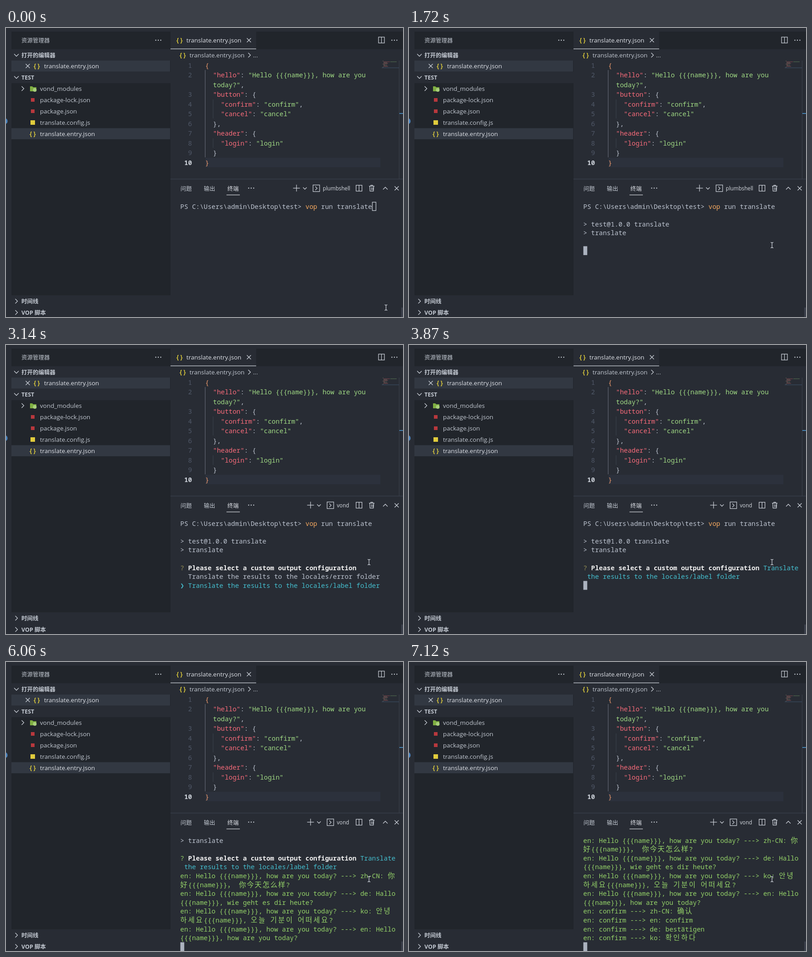
Recreate the animation shown at these times as an HTML page. Size 876 px wide and 639 px high, loop 8 s.

```html
<!DOCTYPE html>
<html lang="zh">
<head>
<meta charset="utf-8">
<title>Terminal translate</title>
<style>
html, body { margin: 0; width: 100%; height: 100%; overflow: hidden; background: #282c34; }
svg { display: block; }
text { font: 13.5px "Open Sans", "Noto Sans CJK SC", sans-serif; fill: #c2c8d1; white-space: pre; }
.mono text { font: 500 14.4px "Noto Sans Mono", "DejaVu Sans Mono", "Noto Sans CJK SC", monospace; fill: #bcc3cf; }
.head { font-size: 12.5px; }
.bold { font-weight: 700; }
.lit { fill: #dfe2e8; }
.label { font-size: 11.7px; fill: #d5d9e0; }
.json { fill: #ecd83c; font-weight: 600; }
.mono .num { fill: #505868; }
.mono .now { fill: #cdd2da; font-weight: 600; }
.key { fill: #f76b7a; }
.str { fill: #a0da84; }
.outer { fill: #ee9a6c; }
.cmd { fill: #f7aa60; }
.ask { fill: #f0f0f0; font-weight: 700; }
.dim { fill: #727985; }
.olive { fill: #968f55; }
.green { fill: #94d268; }
.cyan { fill: #45bfcf; }
.han, .hangul { font-family: "Noto Sans CJK SC", sans-serif; font-weight: 400; font-size: 15.6px; letter-spacing: 1.68px; }
.hangul { letter-spacing: 2.93px; }
.line { fill: none; stroke: #ccd1d9; stroke-width: 1.25; }
</style>
</head>
<body>
<svg id="stage" width="876" height="639" viewBox="0 0 876 639"></svg>
<script>
const stage = document.getElementById('stage');
const CELL = 8.64, ROW = 19.6, LEFT = 385, TOP = 384.5, ROWS = 13, LOOP = 8000;

const rect = (x, y, w, h, fill) => `<rect x="${x}" y="${y}" width="${w}" height="${h}" fill="${fill}"/>`;
const text = (x, y, str, cls = '') => `<text x="${x}" y="${y}" class="${cls}">${str}</text>`;
const line = d => `<path class="line" d="${d}"/>`;
const span = (cls, str) => `<tspan class="${cls}">${str}</tspan>`;
const cross = (x, y) => line(`M${x - 4.5} ${y - 4.5}l9 9m0-9l-9 9`);
const right = (x, y) => line(`M${x - 2.5} ${y - 5}l5 5-5 5`);
const down = (x, y, r = 5) => line(`M${x - r} ${y - r / 2}l${r} ${r} ${r}-${r}`);
const dots = (x, y) => [-5.5, 0, 5.5].map(d => `<circle cx="${x + d}" cy="${y}" r="1.2" fill="#ccd1d9"/>`).join('');
const split = (x, y) => line(`M${x} ${y}h13v13h-13zm6.5 0v13`);
const json = (x, y) => text(x, y, '{ }', 'json');

function sidebar() {
  const file = 'translate.entry.json';
  return rect(12, 8, 351, 631, '#21252b') +
    rect(12, 47, 351, 25, '#282c34') + rect(12, 97, 351, 25, '#282c34') + rect(12, 591, 351, 48, '#282c34') +
    rect(12, 72, 350, 24.5, '#323842') + rect(12, 221.5, 350, 24.5, '#323842') +
    '<circle cx="-3.5" cy="206" r="7" fill="#4a84c0"/>' +
    text(34, 31.5, '资源管理器', 'head') + dots(336, 27) +
    down(23, 60) + text(34, 64.5, '打开的编辑器', 'head bold') +
    cross(48, 84) + json(61, 89) + text(84, 89, file, 'lit') +
    down(23, 109) + text(34, 113.5, 'TEST', 'head bold') +
    right(37, 134) + '<path d="M53 129h5l2 2h7v9H53z" fill="#7fae42"/><circle cx="63.5" cy="137" r="4" fill="#a9cf7c"/>' +
    text(75, 139.3, 'vond_modules') +
    rect(55, 155, 8, 8, '#b8383d') + text(75, 164.3, 'package-lock.json') +
    rect(55, 180, 8, 8, '#b8383d') + text(75, 189, 'package.json') +
    rect(54, 204, 10, 10, '#e0cc3c') + text(75, 214, 'translate.config.js') +
    json(52, 239) + text(75, 239, file, 'lit') +
    right(23, 604) + text(34, 609, '时间线', 'head bold') +
    right(23, 629) + text(34, 633.5, 'VOP 脚本', 'head bold');
}

function editor() {
  const key = s => span('key', `"${s}"`), str = s => span('str', s);
  const pair = s => `  ${key(s)}: ${str(`"${s}"`)}`;
  const rows = [
    [1, span('outer', '{')],
    [2, `  ${key('hello')}: ${str('"Hello {{{name}}}, how are you')}`],
    ['', `  ${str('today?"')},`],
    [3, `  ${key('button')}: {`],
    [4, `  ${pair('confirm')},`],
    [5, `  ${pair('cancel')}`],
    [6, '  },'],
    [7, `  ${key('header')}: {`],
    [8, `  ${pair('login')}`],
    [9, '  }'],
    [10, span('outer', '}')]
  ];
  const code = rows.map(([n, s], i) => {
    const y = 87.6 + i * 21.5;
    return `<text x="410.5" y="${y}" text-anchor="end" class="${n == 10 ? 'now' : 'num'}">${n}</text>` + text(439.5, y, s);
  }).join('');
  const minimap = [2, 14, 8, 10, 10, 3, 8, 10, 2].map((w, i) =>
    rect(831 + (i % 4 ? 2 : 0), 72.5 + i * 1.7, w, 1, i % 2 ? '#7d444d' : '#686359') +
    (i == 1 ? rect(848, 74.2, 14, 1, '#557052') : '')).join('');
  return rect(363, 8, 513, 39, '#21252b') + rect(363, 8, 189, 39, '#282c34') + rect(363, 45.5, 189, 1.3, '#c8ccd4') +
    json(376, 32) + text(398, 32, 'translate.entry.json', 'lit') + cross(536, 27) +
    split(822, 20) + dots(857, 27) +
    json(383, 65) + text(405, 65, 'translate.entry.json') + right(537, 60) + text(545, 65, '...') +
    rect(440, 287, 386, 21, '#2c313c') +
    rect(439, 93, 1, 193, '#6a707b') + rect(456.5, 158, 1, 42, '#3d434d') + rect(456.5, 244, 1, 21, '#3d434d') +
    `<g class="mono">${code}</g>` + minimap + rect(829, 87.5, 38, 1, '#3c5068') +
    rect(867, 72, 1, 262, '#3b414c') + rect(868, 188, 8, 2, '#4584b4');
}

function panel() {
  return rect(363, 333.5, 513, 1, '#3e4452') +
    text(385, 359.5, '问题', 'head') + text(436.5, 359.5, '输出', 'head') + text(488.5, 359.5, '终端', 'head lit') +
    rect(486.5, 368.5, 29.5, 1.2, '#d7dae0') + dots(541, 354) +
    `<g id="tools">${line('M633.5 354h15m-7.5-7.5v15')}${down(659.5, 354.5, 4)}
    ${line('M677.5 347h14.5v14.5h-14.5zm5 3.5l4 4-4 4')}${text(699, 359.3, '', 'label')}</g>` +
    split(772.5, 347.5) +
    line('M801 349.5h12m-8 0v-2h4v2m-6.5 0l.7 11h7.6l.7-11m-5 3v6m3-6v6') +
    line('M832 357l5-5 5 5') + cross(862, 354.5) + rect(872, 618, 4, 21, '#3a3f4a');
}

stage.innerHTML = rect(0, 0, 876, 639, '#282c34') + sidebar() + editor() + panel() +
  '<g id="term" class="mono"></g>' +
  '<path id="mouse" class="line" d="M-3-6q2 0 3 1 1-1 3-1M0-5V5M-3 6q2 0 3-1 1 1 3 1"/>';

const tools = document.getElementById('tools'), label = tools.querySelector('text');
const term = document.getElementById('term'), mouse = document.getElementById('mouse');

const prompt = `PS C:\\Users\\admin\\Desktop\\test> ${span('cmd', 'vop')} run translate`;
const banner = [prompt, '', '> test@1.0.0 translate', '> translate', ''];
const question = (mark, tail = '') => `${span(mark, '?')} ${span('ask', 'Please select a custom output configuration')}${tail}`;
const option = (name, on) => span(on ? 'cyan' : '', `${on ? '❯' : ' '} Translate the results to the locales/${name} folder`);
const answer = mark => [question(mark, span('cyan', ' Translate')), span('cyan', ' the results to the locales/label folder')];

// Hangul glyphs are narrower than Han ones, so each script gets its own spacing on the two-cell grid
const wide = s => s
  .replace(/[\uac00-\ud7a3]+/g, w => span('hangul', w))
  .replace(/[\u4e00-\u9fff\uff0c]+/g, w => span('han', w));

const hello = 'en: Hello {{{name}}}, how are you today? ---> ';
const results = [
  hello + 'zh-CN: 你', '好{{{name}}}， 你今天怎么样?',
  hello + 'de: Hallo', '{{{name}}}, wie geht es dir heute?',
  hello + 'ko: 안녕', '하세요{{{name}}}, 오늘 기분이 어떠세요?',
  hello + 'en: Hello', '{{{name}}}, how are you today?',
  ...['zh-CN: 确认', 'en: confirm', 'de: bestätigen', 'ko: 확인하다'].map(s => 'en: confirm ---> ' + s)
].map(s => span('green', wide(s)));
const done = n => [...banner, ...answer('green'), ...results.slice(0, n)];

// Each scene: start time, lines, cursor style, cursor column (the cursor sits on the next line when the column is 0)
const scenes = [
  [0, [prompt], 'hollow', 49],
  [470, [prompt], 'solid', 49],
  [1260, [prompt], 'solid', 0],
  [1720, banner, 'solid', 0],
  [2580, [...banner, question('olive', span('dim', ' (Use ')), span('dim', 'arrow keys)'), option('error', true), option('label')]],
  [3070, [...banner, question('olive'), option('error'), option('label', true)]],
  [3800, [...banner, ...answer('olive')]],
  [3870, [...banner, ...answer('olive')], 'solid', 0],
  [5990, done(6), 'solid', 0],
  [6060, done(8), 'solid', 0],
  [7050, done(10), 'solid', 0],
  [7120, done(12), 'solid', 0]
];

function drawTerminal([start, lines, cursor, col]) {
  const cursorLine = col ? 0 : lines.length;
  const first = Math.max(0, cursorLine - ROWS + 1);
  const cursorTop = TOP + (cursorLine - first) * ROW;
  let out = lines.slice(first).map((s, i) => text(LEFT - 0.5, TOP + i * ROW + 15, s)).join('');
  if (cursor == 'solid') out += rect(LEFT + col * CELL - 0.3, cursorTop, 8.6, ROW, '#abb2bf');
  if (cursor == 'hollow') out += line(`M${LEFT + col * CELL} ${cursorTop + 0.5}h8v18.6h-8z`);
  term.innerHTML = out;
  const running = start >= 2580;
  label.textContent = running ? 'vond' : 'plumbshell';
  tools.setAttribute('transform', `translate(${running ? 31 : 0})`);
}

let shown;
function frame(now) {
  const t = now % LOOP;
  const scene = scenes.findLast(s => s[0] <= t);
  if (scene !== shown) drawTerminal(shown = scene);
  const step = t < 70 ? 0 : Math.min(6, Math.floor((t - 70) / 80) + 1) / 6;
  mouse.setAttribute('transform', `translate(${838.5 - 37.5 * step} ${618 - 138 * step})`);
  requestAnimationFrame(frame);
}
frame(0);
</script>
</body>
</html>
```
